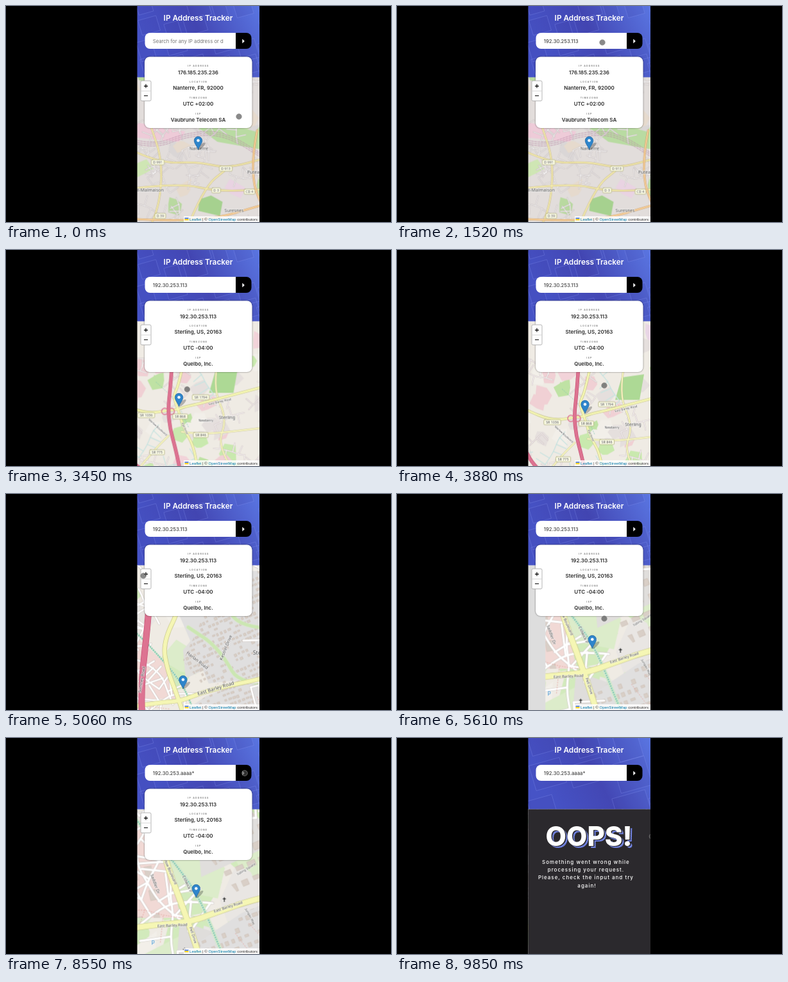
These frames come from a looping animation (600x338 px, 9880 ms). An HTML page with a canvas:

```html
<!DOCTYPE html>
<html lang="en">
<head>
<meta charset="utf-8">
<title>IP Address Tracker</title>
<style>
  html, body { margin: 0; width: 100%; height: 100%; overflow: hidden; background: #000; }
  #map { position: absolute; left: 204px; top: 111px; }
  svg { position: absolute; left: 0; top: 0; font-family: Inter, Roboto, sans-serif; }
  .mid { text-anchor: middle; }
  .title { font-size: 11.8px; font-weight: 600; fill: #fff; }
  .query { font-size: 7.7px; font-weight: 500; fill: #444; }
  .query.empty { font-weight: 400; fill: #757575; }
  .name { font-size: 3.6px; font-weight: 700; letter-spacing: 1.2px; fill: #858585; }
  .value { font-size: 8px; font-weight: 600; fill: #2c2c2c; }
  .card { fill: #fff; filter: drop-shadow(0 0 1.2px rgba(0, 0, 0, .55)); }
  .credit { font: 6.1px "Liberation Sans", Arial, sans-serif; fill: #333; }
  .credit .link { fill: #0078a8; }
  .oops { font-size: 42px; font-weight: 800; }
  .message { font-size: 8px; letter-spacing: 1px; font-weight: 500; fill: #fff; }
  #lines { fill: #39399a; fill-opacity: .12; stroke: #8d9bf5; stroke-width: .9; stroke-opacity: .32; }
</style>
</head>
<body>
<canvas id="map" width="191" height="227"></canvas>
<svg width="600" height="338" viewBox="0 0 600 338">
  <defs>
    <linearGradient id="sky" x1="0" y1=".3" x2="1" y2="0">
      <stop offset="0" stop-color="#4653c6"/>
      <stop offset=".45" stop-color="#4347b4"/>
      <stop offset="1" stop-color="#5a76e2"/>
    </linearGradient>
    <pattern id="hatch" width="2" height="2" patternUnits="userSpaceOnUse" patternTransform="rotate(45)">
      <rect width="2" height="2" fill="#a9b5f2"/>
      <rect width="1.2" height="2" fill="#4a5fd0"/>
    </pattern>
    <clipPath id="phone"><rect x="204.5" width="190.5" height="338"/></clipPath>
    <clipPath id="head"><rect x="204.5" width="190.5" height="111.5"/></clipPath>
    <clipPath id="field"><rect x="228" y="42" width="111" height="25"/></clipPath>
  </defs>

  <rect x="204" width=".5" height="338"/>
  <g clip-path="url(#head)">
    <rect x="204" width="192" height="112" fill="url(#sky)"/>
    <path id="lines"/>
  </g>

  <text class="title mid" x="299.5" y="23.2">IP Address Tracker</text>
  <path d="M358 42H224.5a8 8 0 0 0-8 8v9a8 8 0 0 0 8 8H358Z" fill="#fff"/>
  <path d="M358 42h16.5a8 8 0 0 1 8 8v9a8 8 0 0 1-8 8H358Z"/>
  <path d="M368.3 51.5l3.5 3.5l-3.5 3.5Z" fill="#fff"/>
  <g clip-path="url(#field)"><text id="query" class="query" x="228.8" y="57.9"></text></g>

  <g id="result">
    <rect class="card" x="216" y="79.5" width="167.5" height="111.5" rx="8"/>
    <g id="info" class="mid"></g>
    <rect x="210" y="117" width="16" height="31.5" rx="2" fill="#fff" stroke="#b4b4b4"/>
    <path d="M210.5 133h15" stroke="#ccc" stroke-width=".8"/>
    <path d="M215 125.3h6m-3-3v6m-3 12.2h6" stroke="#000" stroke-width="1.2"/>
    <rect x="277" y="329" width="118" height="9" fill="#fff" opacity=".8"/>
    <rect x="278.5" y="331.3" width="6" height="2" fill="#4c7be1"/>
    <rect x="278.5" y="333.3" width="6" height="2" fill="#ffd500"/>
    <text class="credit" x="286" y="335.6"><tspan class="link">Leaflet</tspan> | © <tspan class="link">OpenStreetMap</tspan> contributors</text>
  </g>

  <g id="error" class="mid">
    <rect x="204.5" y="111.5" width="190.5" height="226.5" fill="#2b292d"/>
    <text class="oops" x="302.5" y="172" fill="url(#hatch)">OOPS!</text>
    <text class="oops" x="300.5" y="169.8" fill="#2b292d">OOPS!</text>
    <text class="oops" x="299" y="168.5" fill="#fff">OOPS!</text>
    <text class="message" y="185.1">
      <tspan x="296" dy="12.1">Something went wrong while</tspan>
      <tspan x="296" dy="12.1">processing your request.</tspan>
      <tspan x="296" dy="12.1">Please, check the input and try</tspan>
      <tspan x="296" dy="12.1">again!</tspan>
    </text>
  </g>

  <g clip-path="url(#phone)">
    <circle id="cursor" r="4.3" fill="#4a4a4a" fill-opacity=".65" stroke="#8e8e8e" stroke-opacity=".8" stroke-width=".8"/>
  </g>
</svg>

<script>
const LOOP = 9880;
const $ = id => document.getElementById(id);

function random(seed) {
  return () => {
    seed = (seed * 1664525 + 1013904223) >>> 0;
    return seed / 4294967296;
  };
}

// ---- map layers, each centred on the marker tip ----
const SIZE = 640, MAX_LEVEL = 3;

function layer(bg, paint) {
  const c = document.createElement('canvas');
  c.width = c.height = SIZE;
  const g = c.getContext('2d');
  g.fillStyle = bg;
  g.fillRect(0, 0, SIZE, SIZE);
  g.translate(SIZE / 2, SIZE / 2);
  g.lineJoin = g.lineCap = 'round';
  paint(g);
  return c;
}

const points = (text, k = 1) => text.split(' ').map(p => p.split(',').map(v => v * k));

function outline(g, pts) {
  g.beginPath();
  pts.forEach(p => g.lineTo(...p));
}

function area(g, text, k, fill) {
  outline(g, points(text, k));
  g.fillStyle = fill;
  g.fill();
}

function curve(g, pts) {
  g.beginPath();
  g.moveTo(...pts[0]);
  for (let i = 1; i < pts.length - 1; i++) {
    const [x, y] = pts[i], [u, v] = pts[i + 1];
    g.quadraticCurveTo(x, y, (x + u) / 2, (y + v) / 2);
  }
  g.lineTo(...pts[pts.length - 1]);
  g.stroke();
}

function roads(g, lines, width, fill, casing) {
  for (const [w, color] of [[width + 1.2, casing], [width, fill]]) {
    g.lineWidth = w;
    g.strokeStyle = color;
    lines.forEach(line => curve(g, line));
  }
}

function dashed(g, pts, width, color, dash = [2, 1.6]) {
  g.save();
  g.setLineDash(dash);
  g.lineCap = 'butt';
  g.lineWidth = width;
  g.strokeStyle = color;
  curve(g, pts);
  g.restore();
}

function patches(g, seed, count, size, colors) {
  const rnd = random(seed);
  for (let i = 0; i < count; i++) {
    const x = (rnd() - .5) * SIZE, y = (rnd() - .5) * SIZE, pts = [];
    g.fillStyle = colors[Math.floor(rnd() * colors.length)];
    for (let a = 0; a < 6; a++) {
      const r = size * (.4 + rnd() * .7);
      pts.push([x + r * Math.cos(a * 1.05), y + r * Math.sin(a * 1.05)]);
    }
    outline(g, pts);
    g.fill();
  }
}

// winding lanes with side streets
function network(seed, count, step) {
  const rnd = random(seed), lines = [];
  for (let i = 0; i < count; i++) {
    let x = (rnd() - .5) * SIZE, y = (rnd() - .5) * SIZE, turn = rnd() * 6.3;
    const lane = [[x, y]];
    for (let j = 0; j < 5; j++) {
      turn += (rnd() - .5) * .9;
      x += step * Math.cos(turn);
      y += step * Math.sin(turn);
      lane.push([x, y]);
      const side = step * (rnd() < .5 ? 1.4 : -1.4);
      lines.push([[x, y], [x - side * Math.sin(turn), y + side * Math.cos(turn)]]);
    }
    lines.push(lane);
  }
  return lines;
}

function houses(g, seed, text, k, step, angle) {
  const rnd = random(seed);
  g.save();
  outline(g, points(text, k));
  g.clip();
  g.rotate(angle);
  g.fillStyle = '#d9cfc7';
  g.strokeStyle = '#c7b9ad';
  g.lineWidth = .5;
  for (let x = -400; x < 400; x += step)
    for (let y = -400; y < 400; y += step * 1.25) {
      const w = step * (.35 + rnd() * .4), h = step * (.3 + rnd() * .35);
      if (rnd() < .7) { g.fillRect(x, y, w, h); g.strokeRect(x, y, w, h); }
    }
  g.restore();
}

function label(g, text, x, y, turn = 0, size = 5, color = '#444') {
  g.save();
  g.translate(x, y);
  g.rotate(turn * Math.PI / 180);
  g.font = `${size}px "Noto Sans", "Open Sans", sans-serif`;
  g.textAlign = 'center';
  g.textBaseline = 'middle';
  g.lineWidth = 1.5;
  g.strokeStyle = 'rgba(255,255,255,.7)';
  g.strokeText(text, 0, 0);
  g.fillStyle = color;
  g.fillText(text, 0, 0);
  g.restore();
}

function badge(g, text, x, y) {
  const w = text.length * 3.2 + 4;
  g.fillStyle = '#fbfbe0';
  g.strokeStyle = '#a8a878';
  g.lineWidth = .7;
  g.beginPath();
  g.roundRect(x - w / 2, y - 4, w, 8, 1.5);
  g.fill();
  g.stroke();
  label(g, text, x, y + .3, 0, 5.4, '#4b4b3c');
}

const nanterre = layer('#e2dddb', g => {
  patches(g, 5, 230, 19, ['#efebe6', '#dad6d6', '#cfe6b4', '#e9d3e2', '#e6dacd', '#b9d9a0']);
  area(g, '-110,-45 -20,-28 -30,-12 -110,-20', 1, '#eecbd8');
  area(g, '-5,-38 35,-42 98,-26 98,0 30,-12', 1, '#b9dba2');
  area(g, '2,78 20,72 38,82 34,104 0,96', 1, '#a6d18f');
  roads(g, network(9, 170, 11), .8, '#fff', '#c4bcbc');
  for (const y of [0, 3, 6])
    dashed(g, points(`-110,${y - 18} -70,${y - 6} -20,${y - 26} 40,${y - 30} 110,${y + 14}`), .8, '#b98aa8', [4, 1]);
  roads(g, ['-110,-2 -62,22 0,19 45,30 110,12', '-80,130 -62,100 -55,20 -75,-40',
    '-110,62 -30,52 30,66 110,62', '-20,130 8,60 45,30'].map(r => points(r)), 1.7, '#f6efb0', '#cbb984');
  roads(g, ['-110,108 0,116 110,84', '92,-30 78,40 110,110'].map(r => points(r)), 2, '#fad29c', '#c99a62');
  badge(g, 'D 991', -63, 20);
  badge(g, 'D 913', 43, 30);
  badge(g, 'D 3', 28, 64);
  badge(g, 'CD 4', 80, 66);
  badge(g, 'D 39', -59, 104);
  label(g, 'Nanterre', 1, -1, 0, 7);
  label(g, 'Puteaux', 90, 36, 0, 7);
  label(g, 'Rueil-Malmaison', -81, 64, 0, 7);
  label(g, 'Suresnes', 56, 96, 0, 7);
});

// positions at the widest zoom
const highways = ['-9,-90 -13,-31 -17,3 -14,35 -5,67 8,130', '-130,20 -94,54 -84,76 -64,96 -20,120'];
const avenues = ['-130,-24 -94,-6 -51,12 -11,5.6 -1.4,4.9 4,2.9 12,.1 36,-5 130,-30',
  '12,-90 0,-34 -8,-18 -6,-7 -3,.8 -.1,9 8,36 25,66 32,130'];
const minor = ['4,40 35,45 130,34', '-90,130 -40,70 -16,46', '62,-80 52,-30 75,20 60,60 96,120'];
const trail = '-36,-38 -18,-22 -6,-9 -1.4,-3 .5,.1 2.7,5 5,11 15,33';

function overview(g, k, level) {
  patches(g, 31, 260, 17 * k, ['#f2d3d9', '#e5dfdd', '#c9e9ae', '#e9d6e6', '#f2efe9', '#bfe2a4', '#f0d0d4']);
  area(g, '47,-21 57,-56 92,-61 85,-21', k, '#add995');
  roads(g, network(44, 150, 10 * k), .9, '#fff', '#d0c3c3');
  roads(g, network(47, 20, 12 * k), .3, '#a8d3dd', '#d5e8e2');
}

function detail(g, k, level) {
  const close = level === MAX_LEVEL, estate = '0,9 9,3 40,-9 40,40 8,40';
  patches(g, 61, 110, 10 * k, ['#f2efe9', '#dcecca', '#e9e6e3', '#dfdddb', '#d2eabc']);
  area(g, '-18,-20 -6,-9 -3,4 -18,4', k, '#f1d9d5');
  area(g, '0,-15 8,-25 25,-15 1,-4', k, '#e0dedc');
  area(g, estate, k, '#e0dfdf');
  if (!close) area(g, '-2,-30 4,-46 60,-46 60,-8 10,-2', k, '#e0dfdf');
  houses(g, 3, estate, k, close ? 11 : 6.5, -.35);
  houses(g, 8, '0,-11 16,-46 60,-46 60,-8 8,-1', k, close ? 19 : 6.5, -.4);
  if (close) houses(g, 15, '-19,-11 -9,-8 -7,4 -19,4', k, 30, -.2);
  for (const y of [-46, -24])
    roads(g, [points(`60,${y + 20} 24,${y + 26} 14,${y + 8} 2,${y}`, k)], k * 1.2, '#cbe6b2', '#d8ecc6');
  roads(g, network(52, close ? 34 : 60, close ? 34 : 22), close ? 3.2 : 2.6, '#fff', '#cfc8c4');
  network(70, 9, 30).forEach(line => dashed(g, line, .8, '#e49a94', [2, 2]));
  g.lineWidth = .75 * k;
  g.strokeStyle = '#d3e9cd';
  curve(g, points(trail, k));
}

// label rows: text, x, y, angle, size
const names = [
  [['Sterling', 75, 18, 0, 7], ['Newberry', 42, 23, 0, 5], ['East Barley Road', 64, -7, -13, 4.6],
    ['Old Elk Road', -20, 104, -5], ['Marlow Boulevard', -33, 33, 42, 4.4], ['Pell Drive', 9, 35, 65, 4.4]],
  [],
  [['Harlan Road', 22, -44, 38, 7], ['Kestrel Drive', 67, -64, -68, 7], ['East Barley Road', 51, 0, -17, 7.6],
    ['Sumner Road', -64, -14, -80, 6.5], ['Sterling', 125, -56, 0, 9]],
  [['East Barley Road', -37, 44, -3, 6], ['East Barley Road', 50, 15, -18, 6], ['Pell Drive', -5, 59, 72, 6],
    ['Saddler Dr', -64, -21, 70, 6.5], ['Colwick P', -14, -21, 66, 6.5], ['Marlow Boulevard', -42, -44, 66, 6],
    ['Tolling Square', 78, -44, -32], ['Juniper Way', 84, 30, 62]]
];

function sterling(level) {
  const k = 2 ** level, wide = 1.43 ** level, far = level < 2;
  const scaled = list => list.map(r => points(r, k));
  return layer('#efebe4', g => {
    (far ? overview : detail)(g, k, level);
    dashed(g, points(trail, k), far ? .8 : 2.4, '#7cc5b5');
    roads(g, scaled(minor), 1.8 * wide, far ? '#f9f7c0' : '#fff', '#c8c49a');
    roads(g, scaled(avenues), 2.9 * wide, '#f5f6b4', '#c3c283');
    roads(g, scaled(highways), 4.3 * wide, '#dd7391', '#c2476d');
    if (far) {
      g.lineWidth = 1.4;
      for (const side of [-5, 5]) {
        g.beginPath();
        g.arc((side - 17) * k, 8 * k, 5 * k, 0, 7);
        g.stroke();
      }
      for (const [n, x, y] of [[1794, 34, -14], [1036, -51, 14], [868, 2, 16], [846, 34, 45], [775, -34, 72], [636, 12, 104]])
        badge(g, 'SR ' + n, x * k, y * k);
    }
    for (const [text, x, y, turn, size] of names[level]) label(g, text, x, y, turn, size);
    if (level === MAX_LEVEL) {
      label(g, 'P', -67, 71, 0, 9, '#2f87c9');
      label(g, '✝', 44, 4, 0, 10, '#111');
      label(g, '✝', -18, 83, 0, 10, '#111');
    }
  });
}

const town = [0, 1, 2, 3].map(sterling);

// ---- timeline ----
// time, x, y; a trailing 1 drags the map on the way there
const POINTER = [[0, 363, 173], [390, 320, 57], [1520, 320, 57], [1940, 370, 55], [2450, 370, 55],
  [2790, 294, 216], [2850, 294, 216], [3400, 264, 236, 1], [3500, 299.5, 201], [3880, 323, 212, 1],
  [4330, 323.6, 201, 1], [4470, 323.6, 201], [4610, 214, 128], [5160, 214, 128], [5340, 271, 338],
  [5610, 323, 195, 1], [5700, 323, 195], [5900, 274, 219, 1], [6150, 293, 235, 1], [6450, 315, 203, 1],
  [6760, 284, 57], [8250, 284, 57], [8540, 372, 55], [9250, 372, 55], [9850, 397.5, 154]];
const FIRST_CLICK = 4620, CLICK_GAP = 230, ZOOM_TIME = 180;
const FOUND = 2270, FAILED = 8960, TILES_IN = 5760;
const CENTER = [299.5, 224.5];

const LABELS = ['IP ADDRESS', 'LOCATION', 'TIMEZONE', 'ISP'];
const HOME = ['176.185.235.236', 'Nanterre, FR, 92000', 'UTC +02:00', 'Vaubrune Telecom SA'];
const AWAY = ['192.30.253.113', 'Sterling, US, 20163', 'UTC -04:00', 'Quelbo, Inc.'];

const clamp = (v, lo, hi) => Math.min(hi, Math.max(lo, v));
const presses = (t, from, gap, max) => clamp(Math.floor((t - from) / gap) + 1, 0, max);

function typed(t) {
  const ip = AWAY[0].slice(0, presses(t, 760, 46, AWAY[0].length));
  return ip.slice(0, ip.length - presses(t, 7150, 90, 3)) + 'aaaa*'.slice(0, presses(t, 7520, 150, 5));
}

function zoomAt(t) {
  const n = (t - FIRST_CLICK) / CLICK_GAP;
  if (n < 0) return [0, 1];
  if (n >= MAX_LEVEL) return [MAX_LEVEL, 1];
  const u = (n % 1) * CLICK_GAP / ZOOM_TIME;
  return u < 1 ? [Math.floor(n), 2 ** (1 - (1 - u) ** 3)] : [Math.floor(n) + 1, 1];
}

// pointer position and map offset at the widest zoom
function gesture(t) {
  let [, x, y] = POINTER[0], px = 0, py = 0;
  for (let i = 1; i < POINTER.length && t > POINTER[i - 1][0]; i++) {
    const t0 = POINTER[i - 1][0], [t1, x1, y1, drag] = POINTER[i];
    const u = Math.min(1, (t - t0) / (t1 - t0)), e = u * u * (3 - 2 * u);
    const dx = (x1 - x) * e, dy = (y1 - y) * e;
    x += dx;
    y += dy;
    if (drag) {
      const scale = 2 ** zoomAt(t1)[0];
      px += dx / scale;
      py += dy / scale;
    }
  }
  return { x, y, px, py };
}

const ctx = $('map').getContext('2d');
const pin = new Path2D('M0 0C-1.5 -5 -6.2 -9 -6.2 -14A6.2 6.2 0 1 1 6.2 -14C6.2 -9 1.5 -5 0 0Z');

function drawMap(t, px, py) {
  const [level, grow] = zoomAt(t), s = 2 ** level * grow, d = SIZE * grow;
  const x = CENTER[0] - 204 + px * s, y = CENTER[1] - 111 + py * s;
  ctx.fillStyle = '#ddd';
  ctx.fillRect(0, 0, 191, 227);
  ctx.drawImage(t < FOUND ? nanterre : town[level], x - d / 2, y - d / 2, d, d);
  if (level === MAX_LEVEL && t < TILES_IN) ctx.fillRect(0, 0, Math.max(0, x - 73), 227);

  ctx.save();
  ctx.translate(x, y);
  ctx.fillStyle = 'rgba(0,0,0,.25)';
  ctx.beginPath();
  ctx.ellipse(5, -5, 8, 2.6, -.75, 0, 7);
  ctx.fill();
  ctx.fillStyle = '#2e85cb';
  ctx.strokeStyle = '#2468a3';
  ctx.lineWidth = .8;
  ctx.fill(pin);
  ctx.stroke(pin);
  ctx.fillStyle = '#fff';
  ctx.beginPath();
  ctx.arc(0, -14, 2.3, 0, 7);
  ctx.fill();
  ctx.restore();
}

// tilted building plots behind the header
function plots(size) {
  const rnd = random(12);
  let d = '';
  for (let x = 200; x < 400; x += size)
    for (let y = -10; y < 115; y += size * .8) {
      const w = size * (.5 + rnd() * .4), h = size * (.4 + rnd() * .4), tilt = w * .28;
      if (rnd() < .75) d += `M${x + rnd() * 9} ${y + rnd() * 9}l${w} ${-tilt}l${h * .3} ${h}l${-w} ${tilt}z`;
    }
  return d;
}

const header = [plots(38), plots(64)];

$('info').innerHTML = LABELS.map((name, i) =>
  `<text class="name" x="300" y="${95.4 + i * 24.75}">${name}</text>` +
  `<text class="value" x="299.5" y="${106.6 + i * 24.75}"></text>`).join('');
const values = document.querySelectorAll('.value');

function render(t) {
  const failed = t >= FAILED, text = typed(t), info = t < FOUND ? HOME : AWAY;
  const { x, y, px, py } = gesture(t);
  $('query').textContent = text || 'Search for any IP address or domain';
  $('query').classList.toggle('empty', !text);
  values.forEach((v, i) => v.textContent = info[i]);
  $('result').style.display = failed ? 'none' : '';
  $('error').style.display = failed ? '' : 'none';
  $('lines').setAttribute('d', header[+failed]);
  $('cursor').setAttribute('transform', `translate(${x} ${y})`);
  if (!failed) drawMap(t, px, py);
}

const start = performance.now();
(function tick() {
  render((performance.now() - start) % LOOP);
  requestAnimationFrame(tick);
})();
</script>
</body>
</html>
```
